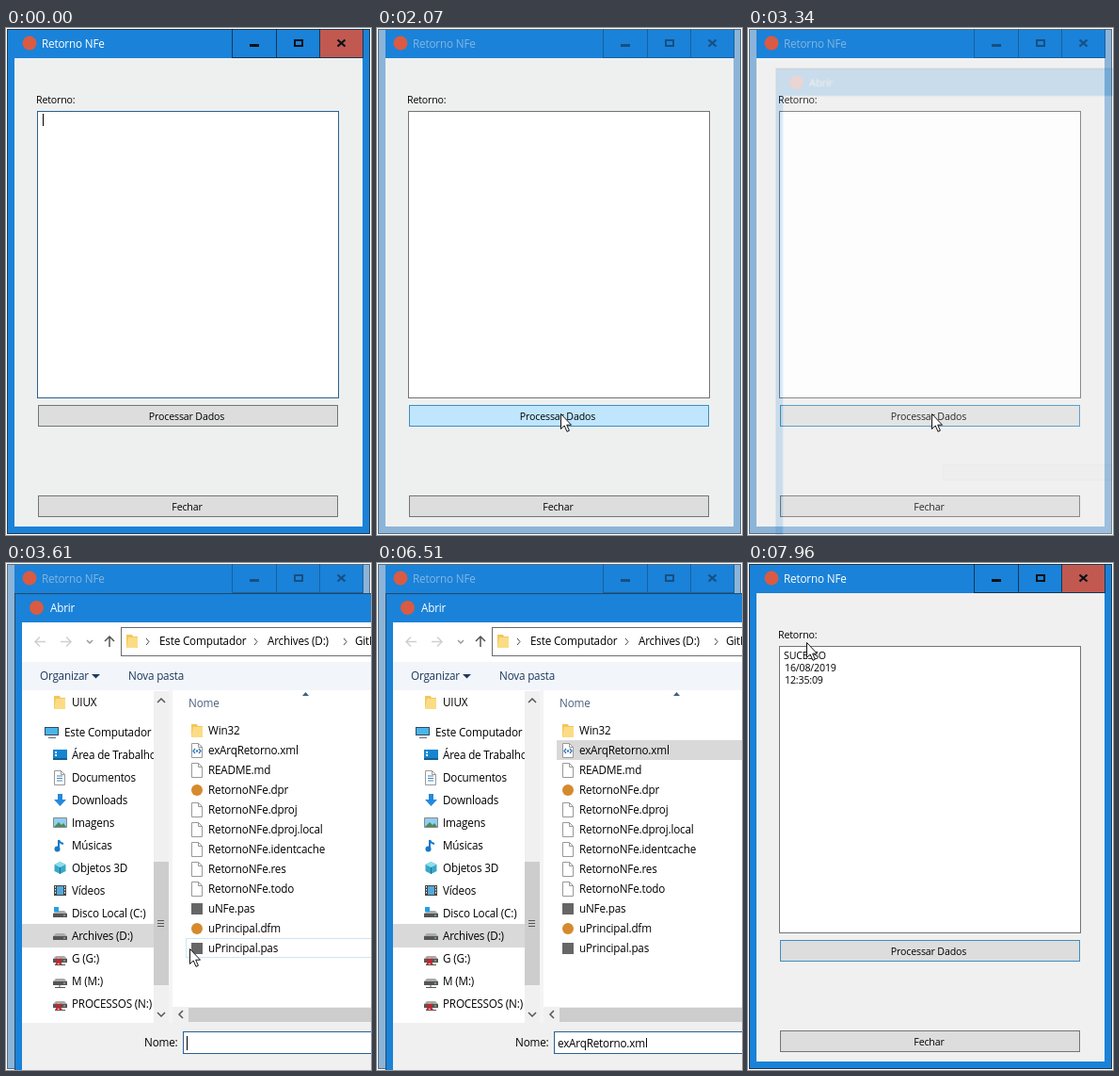
An HTML page for the animation above (8 s loop, 388 px wide and 538 px high).

```html
<!DOCTYPE html>
<html lang="pt-BR">
<head>
<meta charset="utf-8">
<title>Retorno NFe</title>
<style>
html, body { margin: 0; width: 100%; height: 100%; overflow: hidden; background: #fff; }
svg { display: block; width: 388px; height: 538px; }
text { font: 11.7px "Open Sans", "Noto Sans", sans-serif; letter-spacing: -.18px; white-space: pre; }
.form text { font-size: 10.6px; letter-spacing: -.15px; }
.mid { text-anchor: middle; }
rect, .crisp { shape-rendering: crispEdges; }
.step { animation: 8s step-end infinite; }
.flow { animation: 8s linear infinite; }
.pointer { animation: 8s infinite; animation-timing-function: linear, step-end; }

#active { animation-name: active; }
#client { animation-name: client; }
#memo { animation-name: memo; }
#memoCaret { animation-name: memoCaret; }
#result { animation-name: result; }
#process { animation-name: process; }
#dialog { animation-name: dialog; transform-origin: 409px 252px; }
#content { animation-name: content; }
#row { animation-name: row; }
#nameCaret { animation-name: nameCaret; }
#fileName { animation-name: fileName; }
#arrow { animation-name: arrowPath, arrowShow; }
#beam { animation-name: beamPath, beamShow; }

@keyframes active { 0% { opacity: 1 } 3.125% { opacity: 0 } 36.625% { opacity: 1 } 40.875% { opacity: 0 } 82.25%, 100% { opacity: 1 } }
@keyframes client { 0% { fill: #eef0ef } 36.625%, 100% { fill: #f0f0f0 } }
@keyframes memo {
  0% { stroke: #2a628f } 3.125% { stroke: #747474 }
  88.5% { stroke: #0078d7 } 98.6%, 100% { stroke: #747474 }
}
@keyframes memoCaret { 0% { opacity: 1 } 3.125%, 100% { opacity: 0 } }
@keyframes result { 0% { opacity: 0 } 83.125%, 100% { opacity: 1 } }
@keyframes process {
  0%, 18.875% { fill: #dcdddc; stroke: #747474 }
  21.5%, 36.6% { fill: #bfe6fc; stroke: #3c8fc0 }
  36.625%, 40% { fill: #cce4f7; stroke: #2a7fb8 }
  40.875%, 42.6% { fill: #e1e1e1; stroke: #3c8fc0 }
  87.24% { fill: #dcdddc; stroke: #3c8fc0 }
  87.25%, 88.2% { fill: #bfe6fc; stroke: #3c8fc0 }
  91%, 100% { fill: #dcdddc; stroke: #3c8fc0 }
}
@keyframes dialog {
  0%, 40.875% { opacity: 0; transform: scale(.94) }
  41.75%, 42.6% { opacity: .18; transform: scale(.95) }
  44.5%, 82.25% { opacity: 1; transform: none }
  84%, 100% { opacity: 0; transform: scale(.95) }
}
@keyframes content { 0% { opacity: 0 } 43.625%, 100% { opacity: 1 } }
@keyframes row {
  0%, 52.75% { transform: none; fill: #fff; stroke: #cde5f6; animation-timing-function: steps(10) }
  58.75% { transform: translateY(-210px); fill: #e5f3ff; stroke: #e5f3ff }
  63.75% { transform: translateY(-210px); fill: #cce8ff; stroke: #cce8ff }
  79.75%, 100% { transform: translateY(-210px); fill: #d9d9d9; stroke: #d9d9d9 }
}
@keyframes nameCaret { 0% { opacity: 1 } 50.125% { opacity: 0 } 56.75% { opacity: 1 } 63.75%, 100% { opacity: 0 } }
@keyframes fileName { 0% { opacity: 0 } 63.75%, 100% { opacity: 1 } }
@keyframes arrowPath {
  0%, 8.125% { transform: translate(383px, 529px) }
  18.875% { transform: translate(340px, 409px) }
  25.875%, 52.75% { transform: translate(195px, 409px) }
  58.75%, 68.75% { transform: translate(262px, 199px) }
  72.25% { transform: translate(390px, 330px) }
  97.75% { transform: translate(66px, 89px) }
  99.5%, 100% { transform: translate(62px, 84px) }
}
@keyframes arrowShow {
  0% { opacity: 0 } 7.25% { opacity: 1 } 8.125% { opacity: 0 } 18.875% { opacity: 1 }
  72.25% { opacity: 0 } 97.75%, 100% { opacity: 1 }
}
@keyframes beamPath {
  0%, 88.1% { transform: translate(269px, 371px) }
  92% { transform: translate(130px, 195px) }
  95.5% { transform: translate(36px, 110px) }
  97%, 100% { transform: translate(52px, 96px) }
}
@keyframes beamShow { 0% { opacity: 0 } 87.25% { opacity: 1 } 97.75%, 100% { opacity: 0 } }
</style>
</head>
<body>
<svg viewBox="0 0 388 538">
  <defs>
    <g id="controls">
      <path class="crisp" d="M240.5 1v31M287.5 1v31M333.5 1v31M379.5 1v31M240 31.5h140" fill="none" stroke="currentColor" opacity=".65"/>
      <path class="crisp" d="M259 17h10v3h-10z" fill="currentColor"/>
      <path class="crisp" d="M307 13h8v6h-8z" fill="none" stroke="currentColor" stroke-width="2"/>
      <path d="M352.500 12.500l8 7m0-7l-8 7" fill="none" stroke="currentColor" stroke-width="2.2"/>
    </g>
    <g id="folder"><path d="M1 1h6l1 2h5v12H1z" fill="#f2c75c"/><path d="M3 4h10v11H1z" fill="#fbdc85"/></g>
    <g id="doc"><path d="M1.500.500h7l4 4v11h-11z" fill="#fff" stroke="#999"/><path d="M8.500.500v4h4" fill="none" stroke="#999"/></g>
    <g id="xml"><use href="#doc"/><path d="M5 6L3 8.500 5 11M9 6l2 2.500L9 11" fill="none" stroke="#3579b8" stroke-width="1.300"/><circle cx="7" cy="8.500" r="1.200" fill="#3579b8"/></g>
    <circle id="project" cx="7" cy="8" r="6" fill="#d58a2d"/>
    <rect id="unit" x="1" y="2" width="12" height="12" fill="#666"/>
    <g id="monitor"><path d="M0 2h15v9H0z" fill="#34495c"/><path d="M1 3h13v7H1z" fill="#49b5ea"/><path d="M4 13h8v1H4z" fill="#667"/></g>
    <g id="desktop"><path d="M0 2h15v11H0z" fill="#1585cf"/><path d="M0 11h15v2H0z" fill="#155d91"/><path d="M2 4h2v2H2zm0 3h2v2H2z" fill="#fff"/></g>
    <g id="papers"><use href="#doc"/><path d="M4 6h6M4 8.500h6M4 11h6" stroke="#3f85b9"/></g>
    <path id="down" d="M5 1h5v6h4l-6.500 7L1 7h4z" fill="#2489dc"/>
    <g id="image"><path d="M.500 2.500h14v10H.500z" fill="#8dd0f4" stroke="#888"/><path d="M1 12l5-5 3 3 2-2 3 4z" fill="#4f8b5a"/></g>
    <g id="note"><path d="M6 11V2q1 3 5 4" fill="none" stroke="#1679c9" stroke-width="2"/><circle cx="4.500" cy="11.500" r="3" fill="#1679c9"/></g>
    <g id="cube"><path d="M7.500 1l6 3v7l-6 3-6-3V4z" fill="#38a8c5"/><path d="M1.500 4l6 3 6-3-6-3z" fill="#8ddeed"/><path d="M7.500 7v7" stroke="#16748d"/></g>
    <g id="film"><path d="M1 2h13v11H1z" fill="#444"/><path d="M4 3h7v9H4z" fill="#52a9d9"/><path d="M2.500 3v9m10-9v9" stroke="#fff" stroke-dasharray="1.500"/></g>
    <g id="drive"><path d="M3 5h9l3 3H0z" fill="#aaa"/><path d="M0 8h15v4H0z" fill="#555"/><path d="M11 9.500h2v1h-2z" fill="#7df07d"/></g>
    <g id="system"><use href="#drive"/><path d="M1 1h5v5H1z" fill="#23a0e4"/></g>
    <g id="network"><use href="#drive"/><path d="M7 12v2M2 14.500h11" stroke="#555"/></g>
    <g id="offline"><use href="#network"/><path d="M3 8l6 6m0-6l-6 6" stroke="#d3202a" stroke-width="2"/></g>
    <clipPath id="navClip"><path d="M17 135h140v353H17z"/></clipPath>
  </defs>

  <g class="form">
    <rect x="1.500" y="1.500" width="385" height="535" fill="#8bb4d8" stroke="#596b7a"/>
    <rect x="9" y="2" width="371" height="30" fill="#1a82d8"/>
    <rect id="client" class="step" x="9" y="32" width="370" height="497"/>
    <text x="38" y="21" fill="#83b6e3" style="font-size:11.7px">Retorno NFe</text>
    <use href="#controls" color="#174f82"/>
    <g id="active" class="step">
      <path class="crisp" fill="#1a82d8" d="M2 2h384v534H2zM9 32v497h370V32z" fill-rule="evenodd"/>
      <path class="crisp" d="M1.500 1.500h385v535h-385z" fill="none" stroke="#23384a"/>
      <rect x="334" y="2" width="45" height="29" fill="#c15951"/>
      <text x="38" y="21" fill="#fff" style="font-size:11.7px">Retorno NFe</text>
      <use href="#controls" color="#0c1116"/>
    </g>
    <circle cx="25" cy="16" r="7.500" fill="#d95b43"/>
    <text x="32" y="80">Retorno:</text>
    <rect id="memo" class="step" x="33.500" y="88.500" width="320" height="304" fill="#fff"/>
    <rect id="memoCaret" class="step" x="39" y="91" width="1" height="13"/>
    <g id="result" class="step">
      <text x="38" y="102">SUCESSO</text>
      <text x="39" y="115">16/08/2019</text>
      <text x="39" y="128">12:35:09</text>
    </g>
    <rect id="process" class="flow" x="34.500" y="400.500" width="318" height="22"/>
    <text class="mid" x="192" y="416">Processar Dados</text>
    <rect x="34.500" y="496.500" width="318" height="22" fill="#dcdddc" stroke="#747474"/>
    <text class="mid" x="192.500" y="512">Fechar</text>
  </g>

  <g id="dialog" class="flow">
    <rect x="9.500" y="32.500" width="800" height="560" fill="#1a82d8" stroke="#23496b"/>
    <circle cx="32.500" cy="47.500" r="7.500" fill="#d95b43"/>
    <text x="47" y="52" fill="#fff">Abrir</text>
    <rect x="17" y="63" width="780" height="520" fill="#f2f2f2"/>
    <rect x="196.500" y="474.500" width="500" height="17" fill="#e8e8e8" stroke="#ccc"/>
    <g id="content" class="step">
      <rect x="17" y="63" width="780" height="425" fill="#fff"/>
      <rect x="17" y="488" width="780" height="100" fill="#f0f0f0"/>
      <g fill="none" stroke-width="1.500">
        <path d="M42 83.500H31m5-5l-5 5 5 5M58 83.500h11m-5-5l5 5-5 5" stroke="#d0d0d0"/>
        <path d="M86 82l3 3 3-3" stroke="#999"/>
        <path d="M110 89V78m-5 5l5-5 5 5" stroke="#555"/>
      </g>
      <rect x="122.500" y="68.500" width="600" height="30" fill="#fff" stroke="#6b6b6b"/>
      <use href="#folder" x="127" y="75"/>
      <path d="M149 80l3 3.500-3 3.500M264 80l3 3.500-3 3.500M359 80l3 3.500-3 3.500" fill="none" stroke="#444"/>
      <text x="163" y="87">Este Computador</text>
      <text x="278" y="87">Archives (D:)</text>
      <text x="371" y="87">GitH</text>
      <rect x="17" y="105" width="780" height="30" fill="#f2f6fb"/>
      <g fill="#1e395b">
        <text x="36" y="124">Organizar</text>
        <path d="M91 118h9l-4.500 4.500z"/>
        <text x="130" y="124">Nova pasta</text>
      </g>
      <rect x="17" y="383" width="140" height="25" fill="#d9d9d9"/>
      <g id="nav" clip-path="url(#navClip)"></g>
      <rect x="157" y="136" width="16" height="352" fill="#f0f0f0"/>
      <rect x="157" y="317" width="16" height="131" fill="#cdcdcd"/>
      <path d="M161 148l4-4 4 4M161 477l4 4 4-4" fill="none" stroke="#555" stroke-width="1.500"/>
      <path class="crisp" d="M161 379.500h7m-7 3h7m-7 3h7" stroke="#555"/>
      <rect x="173" y="135" width="4" height="353" fill="#f4f4f4"/>
      <text x="194" y="153" fill="#4c607a">Nome</text>
      <path d="M315 141h7l-3.500-4z" fill="#3d6185"/>
      <rect id="row" class="step" x="191.500" y="398.500" width="400" height="20"/>
      <g id="files"></g>
      <rect x="177" y="471" width="620" height="17" fill="#f0f0f0"/>
      <rect x="194" y="472" width="500" height="15" fill="#cdcdcd"/>
      <path d="M188 475l-4 4 4 4" fill="none" stroke="#555" stroke-width="1.500"/>
      <text x="147" y="513">Nome:</text>
      <rect x="188.500" y="497.500" width="600" height="23" fill="#fff" stroke="#2b5f91"/>
      <rect id="nameCaret" class="step" x="192" y="502" width="1" height="15"/>
      <text id="fileName" class="step" x="192" y="514">exArqRetorno.xml</text>
    </g>
  </g>

  <path id="arrow" class="pointer" d="M.500.500v16l3.700-3.500 2.800 6.300 2.400-1.100-2.700-6h4.800z" fill="#fff" stroke="#111"/>
  <path id="beam" class="pointer" d="M-3-7.500h2.500L.500-6.500l1-1H4M.500-6.500v13M-3 7.500h2.500l1-1 1 1H4" fill="none" stroke="#222"/>
</svg>
<script>
const item = (icon, iconX, textX, base, label) =>
  `<use href="#${icon}" x="${iconX}" y="${base - 12}"/><text x="${textX}" y="${base}">${label}</text>`;

const places = [
  ['desktop', 'Área de Trabalho'], ['papers', 'Documentos'], ['down', 'Downloads'],
  ['image', 'Imagens'], ['note', 'Músicas'], ['cube', 'Objetos 3D'], ['film', 'Vídeos'],
  ['system', 'Disco Local (C:)'], ['drive', 'Archives (D:)'], ['offline', 'G (G:)'],
  ['network', 'M (M:)'], ['offline', 'PROCESSOS (N:)']
];
document.getElementById('nav').innerHTML =
  item('folder', 50, 70, 152, 'UIUX') + item('monitor', 41, 62, 184, 'Este Computador') +
  places.map(([icon, label], i) => item(icon, 50, 70, 208 + i * 24, label)).join('');

const files = [
  ['folder', 'Win32'], ['xml', 'exArqRetorno.xml'], ['doc', 'README.md'],
  ['project', 'RetornoNFe.dpr'], ['doc', 'RetornoNFe.dproj'], ['doc', 'RetornoNFe.dproj.local'],
  ['doc', 'RetornoNFe.identcache'], ['doc', 'RetornoNFe.res'], ['doc', 'RetornoNFe.todo'],
  ['unit', 'uNFe.pas'], ['project', 'uPrincipal.dfm'], ['unit', 'uPrincipal.pas']
];
document.getElementById('files').innerHTML =
  files.map(([icon, label], i) => item(icon, 196, 215, 182 + i * 21, label)).join('');
</script>
</body>
</html>
```
